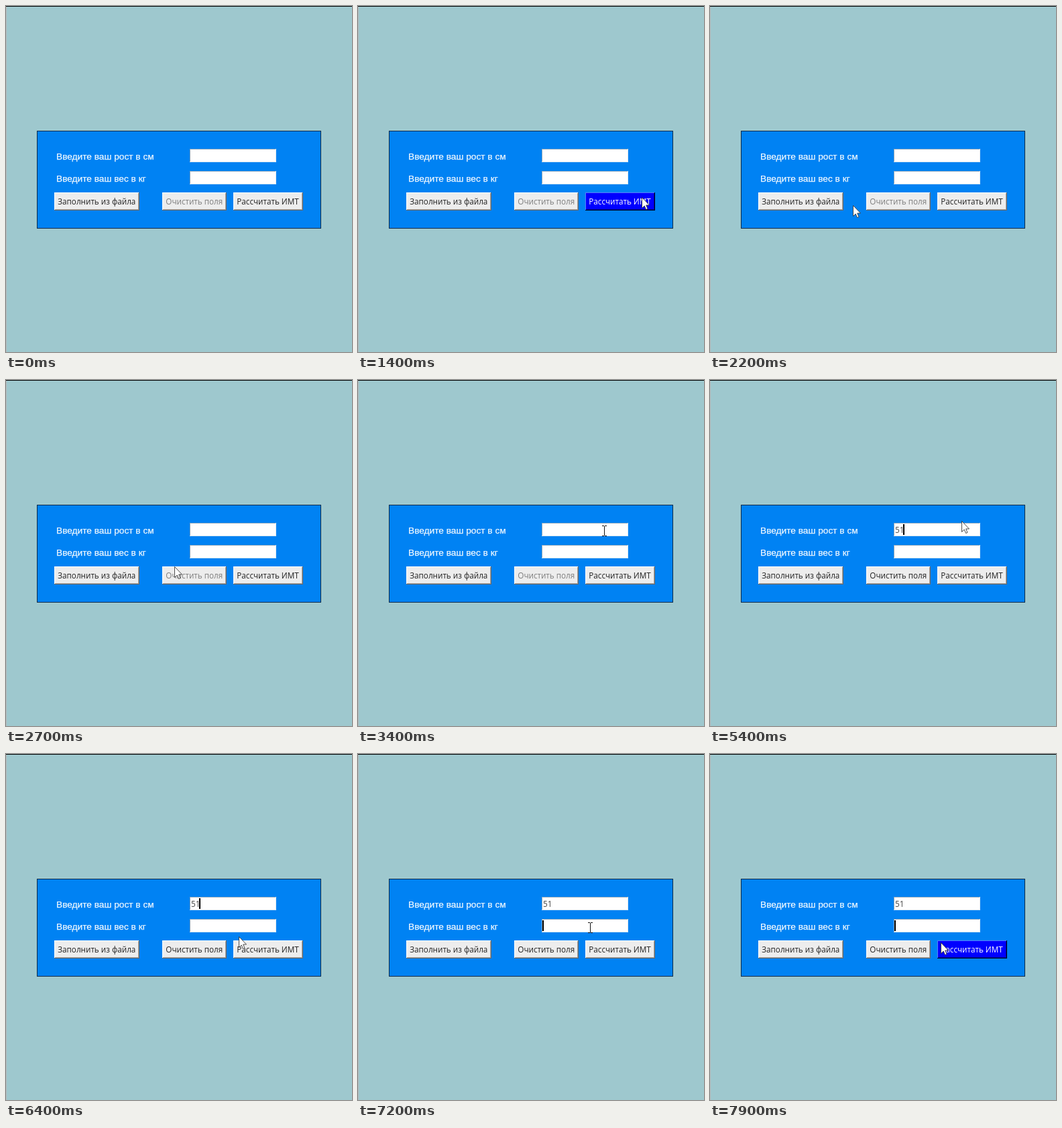
Animation, 516 px wide and 516 px high, one loop 8000 ms. Source, as an HTML page:

```html
<!DOCTYPE html>
<html lang="ru">
<head>
<meta charset="utf-8">
<title>ИМТ</title>
<style>
  html, body { margin: 0; width: 100%; height: 100%; overflow: hidden; background: #9ec8ce; }
  svg { display: block; width: 100vw; height: 100vh; }
  rect, .beam { shape-rendering: crispEdges; }
  .label { font: 13.7px "Liberation Sans", Arial, sans-serif; fill: #f0f8ff; stroke: #f0f8ff; stroke-width: .25px; }
  .ui { font: 11.7px "Open Sans", "Noto Sans", sans-serif; fill: #444; }
</style>
</head>
<body>
<svg id="stage" viewBox="0 0 516 516"></svg>
<script>
const LOOP = 8000, STEP = 100;
const BLINK_ON = 600, BLINK_CYCLE = 900;
const DIGIT_WIDTH = 6.6;
const stage = document.getElementById('stage');

function add(tag, attrs, text) {
  const el = document.createElementNS('http://www.w3.org/2000/svg', tag);
  for (const key in attrs) el.setAttribute(key, attrs[key]);
  if (text) el.textContent = text;
  return stage.appendChild(el);
}
const rect = (x, y, width, height, fill) => add('rect', { x, y, width, height, fill });
const show = (el, on) => el.setAttribute('visibility', on ? 'visible' : 'hidden');
const inside = (p, b) => p && p.x >= b.x && p.x < b.x + b.w && p.y >= b.y && p.y < b.y + b.h;

function makeButton(x, w, text) {
  const y = 278, h = 27;
  const dark = rect(x, y, w, h);
  const light = rect(x, y, w - 1, h - 1);
  const shade = rect(x + 1, y + 1, w - 2, h - 2);
  const face = rect(x + 1, y + 1, w - 3, h - 3);
  const caption = add('text', { x: x + 5.3, y: 296, class: 'ui' }, text);
  const paint = (hover, disabled) => {
    dark.setAttribute('fill', hover ? '#000020' : '#696969');
    light.setAttribute('fill', hover ? '#5a78ff' : '#fff');
    shade.setAttribute('fill', hover ? '#000099' : '#a0a0a0');
    face.setAttribute('fill', hover ? '#0000ff' : '#ededed');
    caption.style.fill = hover ? '#fff' : disabled ? '#7e7e7e' : '#222';
  };
  return { x, y, w, h, paint };
}

function makeEntry(y) {
  const x = 274, w = 129, h = 20;
  rect(x, y, w, h, '#d5e4f2');
  rect(x, y, w - 1, h - 1, '#8fa9c0');
  rect(x + 1, y + 1, w - 2, h - 2, '#fff');
  const text = add('text', { x: 276, y: y + 15, class: 'ui' });
  const caret = rect(275, y + 2, 2, 16, '#000');
  return { x, y, w, h, text, caret };
}

rect(0, 0, 516, 516, '#9ec8ce');
rect(0, 0, 1, 516, '#b3b9ba');
rect(0, 0, 516, 1, '#000');
rect(46, 186, 424, 146, '#0c2b49');
rect(47, 187, 422, 144, '#0082f3');
add('text', { x: 75, y: 228.6, class: 'label' }, 'Введите ваш рост в см');
add('text', { x: 75, y: 261.6, class: 'label' }, 'Введите ваш вес в кг');

const [heightEntry, weightEntry] = [213, 246].map(makeEntry);
const entries = [heightEntry, weightEntry];
const fillButton = makeButton(72, 127, 'Заполнить из файла');
const clearButton = makeButton(233, 96, 'Очистить поля');
const calcButton = makeButton(339, 104, 'Рассчитать ИМТ');

const arrow = add('path', {
  d: 'M.5 .5V16.5L4.2 13L6.6 18.5L9 17.5L6.7 12H11.5Z',
  fill: '#fff', stroke: '#3a3a3a', 'stroke-width': .9
});
const beam = add('path', {
  d: 'M-3 -7.5H0M1 -7.5H4M.5 -7V7M-3 7.5H0M1 7.5H4',
  fill: 'none', stroke: '#111', class: 'beam'
});

// The pointer rests between moves and eases along each one
const entrance = { x: 264, y: 445 };
const moves = [
  { from: 800, to: 1400, x: 423, y: 285 },
  { from: 1600, to: 2200, x: 213, y: 297 },
  { from: 2200, to: 2500, x: 165, y: 292 },
  { from: 2600, to: 2700, x: 251, y: 278 },
  { from: 2700, to: 3500, x: 372, y: 223 },
  { from: 3700, to: 4000, x: 375, y: 210 },
  { from: 5900, to: 6400, x: 347, y: 272 },
  { from: 6400, to: 6800, x: 346, y: 257 },
  { from: 7100, to: 7600, x: 344, y: 281 }
];
const ease = k => k * k * (3 - 2 * k);

function pointerAt(t) {
  if (t < moves[0].from) return null;
  let { x, y } = entrance;
  for (const move of moves) {
    const k = ease(Math.min(1, Math.max(0, (t - move.from) / (move.to - move.from))));
    x += (move.x - x) * k;
    y += (move.y - y) * k;
  }
  return { x: Math.round(x), y: Math.round(y) };
}

// Each click or key restarts the caret blink
const inputs = [
  { at: 3500, entry: heightEntry, value: '' },
  { at: 4600, entry: heightEntry, value: '5' },
  { at: 5000, entry: heightEntry, value: '51' },
  { at: 6900, entry: weightEntry, value: '51' }
];

function render(t) {
  const last = inputs.filter(input => input.at <= t).pop();
  const value = last ? last.value : '';
  heightEntry.text.textContent = value;
  heightEntry.caret.setAttribute('x', 275 + value.length * DIGIT_WIDTH);
  for (const entry of entries) {
    show(entry.caret, last && last.entry === entry && (t - last.at) % BLINK_CYCLE < BLINK_ON);
  }

  const pointer = pointerAt(t);
  fillButton.paint(inside(pointer, fillButton));
  clearButton.paint(false, !value);
  calcButton.paint(inside(pointer, calcButton));

  const overText = entries.some(entry => inside(pointer, entry));
  show(arrow, pointer && !overText);
  show(beam, pointer && overText);
  if (pointer) {
    const place = `translate(${pointer.x} ${pointer.y})`;
    arrow.setAttribute('transform', place);
    beam.setAttribute('transform', place);
  }
}

const start = performance.now();
function tick() {
  const t = (performance.now() - start) % LOOP;
  render(Math.floor(t / STEP) * STEP);
  requestAnimationFrame(tick);
}
tick();
</script>
</body>
</html>
```
